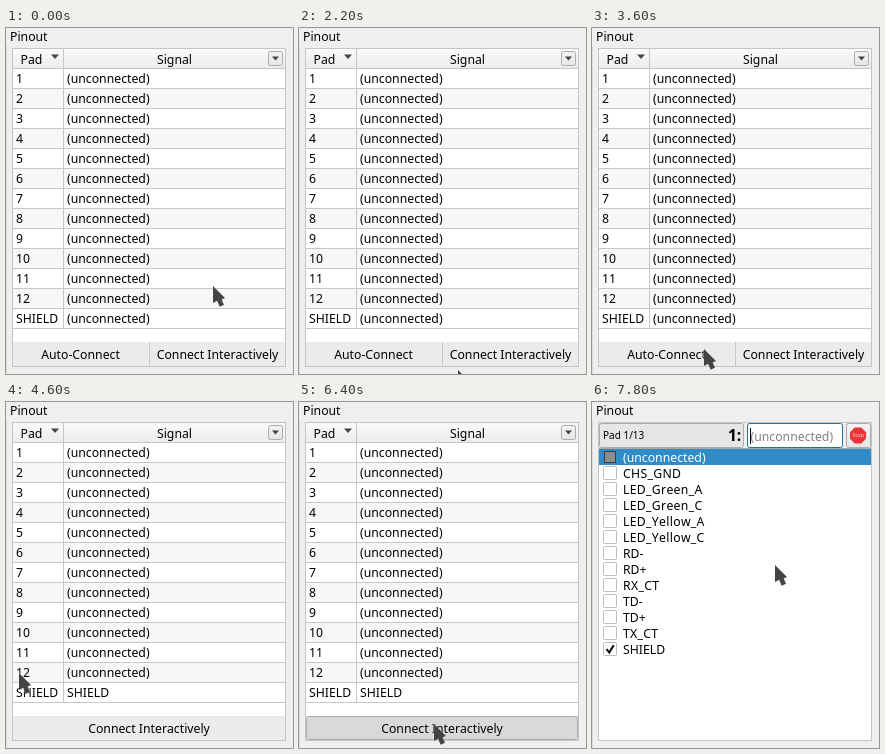
An HTML page that plays this animation: 287x346 px, repeating every 8 s.

```html
<!DOCTYPE html>
<html lang="en">
<head>
<meta charset="utf-8">
<title>Pinout</title>
<style>
  html, body { margin: 0; width: 100%; height: 100%; overflow: hidden; background: #efefef; }
  svg { display: block; width: 287px; height: 346px; }
  text { font: 12.25px "Noto Sans", sans-serif; font-kerning: none; fill: #000; white-space: pre; }
</style>
</head>
<body>
<svg id="stage" viewBox="0 0 287 346">
  <defs>
    <linearGradient id="head" x2="0" y2="1">
      <stop offset="0" stop-color="#fafafa"/><stop offset="1" stop-color="#ececec"/>
    </linearGradient>
    <linearGradient id="raised" x2="0" y2="1">
      <stop offset="0" stop-color="#f3f3f3"/><stop offset="1" stop-color="#e6e6e6"/>
    </linearGradient>
  </defs>
</svg>
<script>
const LOOP = 8000, STEP = 100;
const GRID = '#c7c7c7', EDGE = '#ababab';
const NS = 'http://www.w3.org/2000/svg';
const stage = document.getElementById('stage');

function add(parent, tag, attrs, content) {
  const el = document.createElementNS(NS, tag);
  for (const k in attrs) el.setAttribute(k, attrs[k]);
  if (content !== undefined) el.textContent = content;
  return parent.appendChild(el);
}
const group = parent => add(parent, 'g', {});
const rect = (p, x, y, width, height, fill, more) =>
  add(p, 'rect', { x, y, width, height, fill, ...more });
// Crisp one-pixel outline that covers the given pixel box
const box = (p, x, y, w, h, fill, stroke, rx = 0) =>
  rect(p, x + .5, y + .5, w - 1, h - 1, fill, { stroke, rx });
const label = (p, x, y, s, style = '') => add(p, 'text', { x, y, style }, s);
const middle = (p, x, y, s, style = '') => label(p, x, y, s, 'text-anchor:middle;' + style);
const shape = (p, d, fill, more) => add(p, 'path', { d, fill, ...more });
const show = (el, on) => el.setAttribute('visibility', on ? 'inherit' : 'hidden');

// Group box
rect(stage, 0, 18, 1, 328, '#dcdcdc');
label(stage, 4, 13, 'Pinout');
box(stage, 6, 20, 274, 319, '#efefef', '#c4c4c4');

// Pin table
const table = group(stage);
rect(table, 7, 21, 272, 293, '#fff');
rect(table, 7, 21, 272, 19, 'url(#head)');
rect(table, 7, 40, 272, 1, GRID);
rect(table, 57, 21, 1, 280, GRID);
label(table, 14.5, 36, 'Pad');
middle(table, 168.5, 36, 'Signal');
shape(table, 'M45 26.5h8l-4 4.5z', '#444');
box(table, 262, 23, 15, 15, 'url(#raised)', EDGE, 2);
shape(table, 'M266 28.5h7l-3.5 4z', '#444');

const pads = [...Array(12).keys()].map(i => String(i + 1)).concat('SHIELD');
let lastSignal;
pads.forEach((pad, i) => {
  const y = 41 + 20 * i;
  for (const [x, w] of [[7, 50], [58, 221]]) {
    if (i % 2) rect(table, x, y, w, 19, '#f7f7f7');
    rect(table, x, y + 19, w, 1, GRID);
  }
  label(table, 10, y + 14, pad);
  lastSignal = label(table, 61, y + 14, '(unconnected)');
});

// Buttons below the table
function button(x, w, s) {
  const g = group(table);
  const up = rect(g, x, 314, w, 24, '#ebebeb');
  const down = box(g, x, 314, w, 24, '#d9d9d9', EDGE, 2);
  middle(g, x + w / 2, 331, s);
  return { show: on => show(g, on), press: on => { show(up, !on); show(down, on); } };
}
const divider = rect(table, 143, 314, 1, 24, GRID);
const auto = button(7, 135, 'Auto-Connect');
const half = button(144, 135, 'Connect Interactively');
const wide = button(7, 272, 'Connect Interactively');
half.press(false);

// Interactive mode
const pick = group(stage);
box(pick, 7, 21, 145, 25, '#e6e6e6', EDGE, 2);
label(pick, 11, 37, 'Pad 1/13', 'font-size:10px');
label(pick, 136, 39, '1:', 'font-size:15.5px;font-weight:700');
box(pick, 155, 21, 96, 25, '#fff', '#26709e', 2);
label(pick, 158.5, 38.5, '(unconnected)', 'fill:#808080');
const caret = rect(pick, 158, 26, 1, 16, '#000');
box(pick, 254, 21, 25, 25, 'url(#raised)', EDGE, 2);
shape(pick, 'M262.7 25.5h6.6l4.7 4.7v6.6l-4.7 4.7h-6.6l-4.7-4.7v-6.6z', '#ea3438');
middle(pick, 266, 35.3, 'Stop', 'font-size:5.5px;fill:#fbd0d0');

rect(pick, 7, 46, 272, 1, EDGE);
rect(pick, 7, 47, 272, 291, '#fff');
rect(pick, 7, 47, 272, 16, '#308cc6');
const leds = ['Green', 'Yellow'].flatMap(c => ['A', 'C'].map(end => `LED_${c}_${end}`));
const signals = ['(unconnected)', 'CHS_GND', ...leds,
  'RD-', 'RD+', 'RX_CT', 'TD-', 'TD+', 'TX_CT', 'SHIELD'];
signals.forEach((s, i) => {
  const y = 47 + 16 * i;
  const style = (i ? '' : 'fill:#fff;') + (s.includes('_') ? 'letter-spacing:.3px' : '');
  if (i) box(pick, 11, y + 1, 14, 14, '#fff', '#bdbdbd', 1);
  else box(pick, 12, y + 2, 12, 12, '#8c8c8c', '#3c3c3c');
  if (s === 'SHIELD')
    shape(pick, `M14.5 ${y + 8}l2.8 3.6l4.4-7.4`, 'none', { stroke: '#000', 'stroke-width': 2 });
  label(pick, 31, y + 12.7, s, style);
});

const cursor = shape(stage, 'M0 0V17L4.2 14.8L6.6 20.8L11 18.8L8.6 13.4L12 12Z', '#444',
  { stroke: '#f4f4f4', 'stroke-width': .8, 'stroke-opacity': .8, 'paint-order': 'stroke' });

// Pointer moves along Bezier curves and rests between them
const power = p => k => k ** p;
const smooth = k => k * k * (3 - 2 * k);
const move = (start, end, ease, ...points) => ({ start, end, ease, points });
const moves = [
  move(700, 1600, power(2), [207, 258], [23, 307]),
  move(1600, 2300, power(1), [23, 307], [0, 325], [80, 390], [212, 320]),
  move(2300, 2800, power(1), [212, 320], [190, 285], [112, 321]),
  move(3900, 4500, smooth, [112, 321], [60, 295], [11, 264]),
  move(4500, 5000, power(1.5), [11, 264], [20, 305], [88, 293]),
  move(5300, 5900, smooth, [88, 293], [135, 322]),
  move(7000, 7600, smooth, [135, 322], [135, 250], [183, 163])
];

const mix = (a, b, k) => a.map((v, i) => v + (b[i] - v) * k);
function bezier(points, k) {
  while (points.length > 1) points = points.slice(1).map((b, i) => mix(points[i], b, k));
  return points[0].map(Math.round);
}
function pointAt(t) {
  const m = moves.findLast(m => t >= m.start) || moves[0];
  const k = Math.min(1, Math.max(0, (t - m.start) / (m.end - m.start)));
  return bezier(m.points, m.ease(k));
}

const within = (t, a, b) => t >= a && t < b;

function draw(now) {
  const t = Math.floor((now % LOOP) / STEP) * STEP;
  const connected = t >= 3700, picking = t >= 6700;
  show(table, !picking);
  show(pick, picking);
  show(divider, !connected);
  auto.show(!connected);
  half.show(!connected);
  wide.show(connected);
  auto.press(within(t, 3300, 3600));
  wide.press(within(t, 6400, 6700));
  lastSignal.textContent = connected ? 'SHIELD' : '(unconnected)';
  // An inherited state keeps the caret hidden with its panel
  show(caret, !within(t, 7300, 7800));
  cursor.setAttribute('transform', `translate(${pointAt(t)})`);
}

const start = performance.now();
function tick() {
  draw(performance.now() - start);
  requestAnimationFrame(tick);
}
tick();
</script>
</body>
</html>
```
